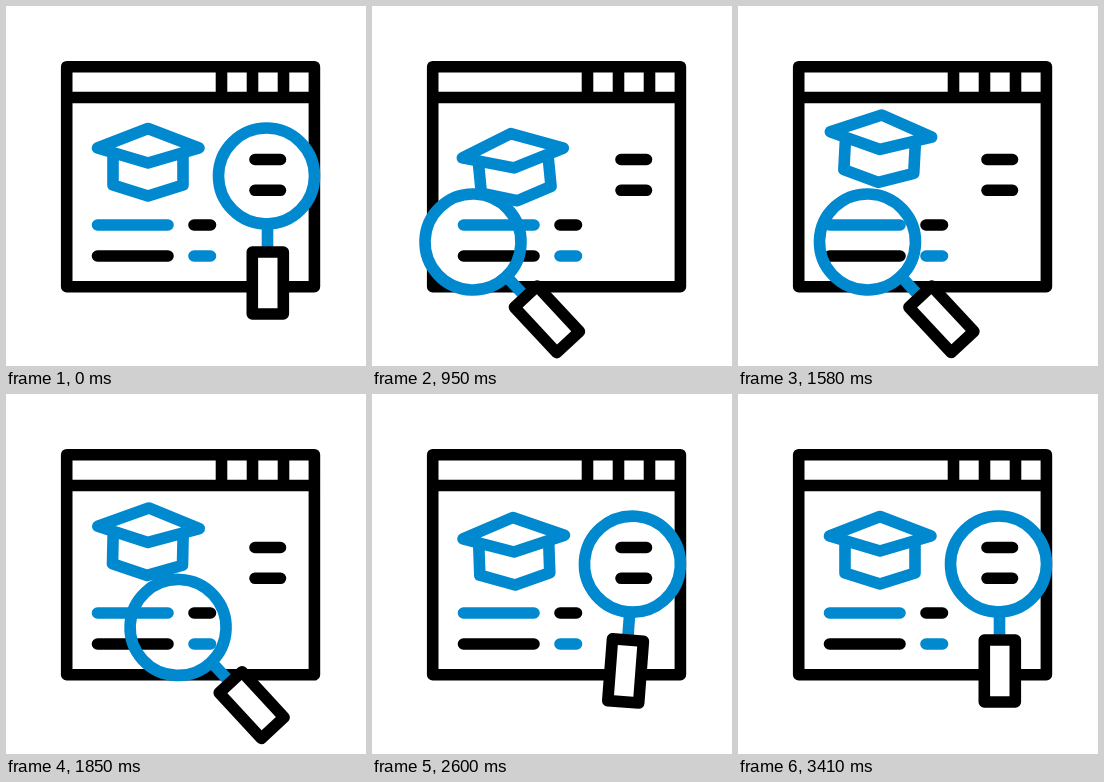
Write an HTML page that moves like this. It is 360 px wide and 360 px high and loops after 3.47 s.

```html
<!DOCTYPE html>
<html lang="en">
<head>
<meta charset="utf-8">
<title>Course search</title>
<style>
  html, body { margin: 0; width: 100%; height: 100%; overflow: hidden; background: #fff; }
  svg { display: block; width: 100vw; height: 100vh; }
  g { fill: none; stroke: #000; stroke-width: 11.6; stroke-linecap: round; stroke-linejoin: round; }
  .blue { stroke: #0089ce; }
  .white { fill: #fff; }
  .disc { fill: #fff; stroke: none; }
</style>
</head>
<body>
<svg viewBox="0 0 360 360">
  <g>
    <path d="M60.7 60.7H308.4V280.7H60.7ZM60.7 91.5H308.4M215.5 60.7V91.5M246.5 60.7V91.5M277.5 60.7V91.5"/>
    <circle class="disc lens" r="48"/>
    <path d="M249 153.5H274.5M249 184.3H274.5M188 219H204.5M91.5 250H162"/>
    <path class="blue" d="M91.5 219H162M188 250H204.5"/>
    <path id="cap" class="blue" d="M142 122.5L193 142L142 157L91.5 142ZM107 148V179L142 190L177 179V148"/>
  </g>
  <g class="lens">
    <path class="blue" d="M1 48V76"/>
    <circle class="blue" r="48"/>
    <rect class="white" x="-14.2" y="76" width="31" height="62"/>
  </g>
</svg>
<script>
const LOOP = 3470, START = 230, STEP = 30;
const lenses = document.querySelectorAll('.lens');
const cap = document.getElementById('cap');

// Sine ease from 0 to 1 between two times
function ease(t, from, to) {
  const u = Math.min(1, Math.max(0, (t - from) / (to - from)));
  return (1 - Math.cos(Math.PI * u)) / 2;
}

function drawLens(t) {
  // Sweep to the left, read along the lines, then swing back up
  const go = ease(t, START, 910), back = ease(t, 1180, 2620);
  const x = 260.5 - 159.5 * (go - back);
  const y = 170 + 66 * (go ** 1.35 - back ** 4);
  const angle = -43 * go ** 1.9 + 47.5 * back ** 6.5 - 4.5 * ease(t, 2600, 2900);
  for (const el of lenses) el.setAttribute('transform', `translate(${x} ${y}) rotate(${angle})`);
}

function drawCap(t) {
  const dip = ease(t, 650, 950), hop = ease(t, 950, 1580);
  const land = ease(t, 1580, 2260), settle = ease(t, 2600, 3400);
  const y = 5 * dip - 18.5 * hop + 14.5 * land - settle;
  const tilt = -5.6 * dip + 8.6 * hop - 5 * land + 2 * settle;
  cap.setAttribute('transform', `translate(${tilt / 4} ${y}) rotate(${tilt} 142 142)`);
}

const begin = performance.now();
function tick() {
  const time = (performance.now() - begin) % LOOP;
  const t = START + Math.floor((time - START) / STEP) * STEP;
  drawLens(t);
  drawCap(t);
  requestAnimationFrame(tick);
}
tick();
</script>
</body>
</html>
```
